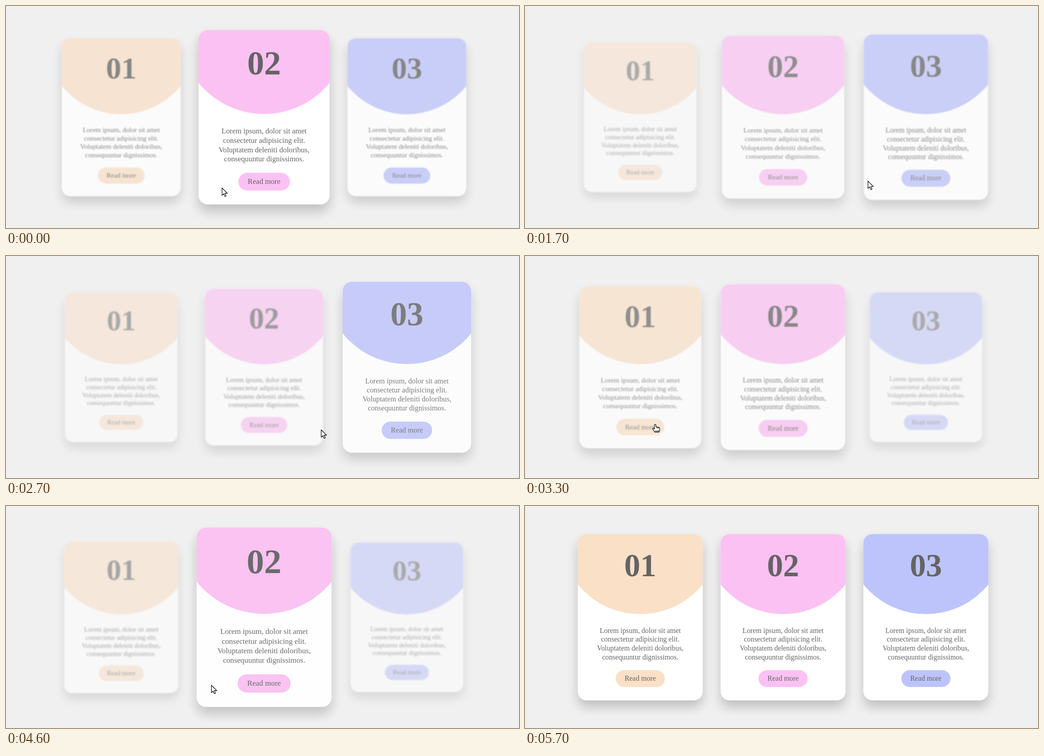
An HTML page that plays this animation: 1135 px wide and 493 px high, repeating every 5800 ms.

```html
<!DOCTYPE html>
<html lang="en">
<head>
<meta charset="utf-8">
<title>Hover cards</title>
<style>
  html, body { margin: 0; width: 100%; height: 100%; overflow: hidden; background: #f0f0f0; }
  #stage { position: relative; width: 1135px; height: 493px; overflow: hidden; }
  .card {
    position: absolute; width: 280px; height: 374px; top: 60px; overflow: hidden;
    border-radius: 20px; background: #fff; box-shadow: 0 15px 25px rgba(0, 0, 0, .2);
    font: 16px/20px "Liberation Serif", "Times New Roman", serif;
    color: #646464; text-align: center;
  }
  .card > * { position: absolute; margin: 0; }
  .disc { width: 360px; height: 360px; left: -40px; top: -180.5px; border-radius: 50%; background: var(--tint); }
  .number { width: 100%; top: 35.3px; font-size: 72px; line-height: 72px; font-weight: bold; }
  .copy { width: 100%; top: 206.5px; white-space: nowrap; }
  .button {
    left: 85px; top: 306px; width: 110px; height: 38px; line-height: 38px;
    border-radius: 19px; background: var(--tint); white-space: nowrap;
  }
  #cursor { position: absolute; left: 0; top: 0; width: 40px; height: 40px; overflow: visible; }
  #cursor path { fill: #fff; stroke: #111; stroke-width: 1.3; stroke-linejoin: round; }
</style>
</head>
<body>
<div id="stage"></div>
<script>
const LOOP = 5800, STEP = 100, DURATION = 500;
const UNIT = 0.9875, FIRST_X = 255.3, PITCH = 316, CENTER_Y = 247;
const HOVER = 1.1, DIM = 0.9, REST = 1;

// The pointer leaves a card GAP ms before it enters the next, and leaves them all at EXIT.
const GAP = 35, EXIT = 5150;
const visits = [
  { card: 1, enter: -145 }, { card: 2, enter: 1560 }, { card: 1, enter: 2620 },
  { card: 0, enter: 3183 }, { card: 1, enter: 4290 }
];

const stops = [
  { t: 0, x: 478, y: 404 }, { t: 1100, x: 583, y: 396 }, { t: 2100, x: 876, y: 384 },
  { t: 2200, x: 876, y: 384 }, { t: 2450, x: 868, y: 391 }, { t: 3300, x: 288, y: 374 },
  { t: 3800, x: 262, y: 383 }, { t: 4200, x: 347, y: 368 }, { t: 5000, x: 562, y: 428 },
  { t: 5100, x: 562, y: 428 }, { t: 5200, x: 562, y: 520 }
];

const stage = document.getElementById('stage');
const copy = ['Lorem ipsum, dolor sit amet', 'consectetur adipisicing elit.',
  'Voluptatem deleniti doloribus,', 'consequuntur dignissimos.'].join('<br>');

// A card dims when any card is first entered, grows while visited, and rests after the exit.
function movesFor(card) {
  const moves = [{ t: visits[0].enter, scale: DIM }];
  visits.forEach((visit, i) => {
    if (visit.card !== card) return;
    const next = visits[i + 1];
    moves.push({ t: visit.enter, scale: HOVER });
    moves.push(next ? { t: next.enter - GAP, scale: DIM } : { t: EXIT - GAP, scale: REST });
  });
  if (moves[moves.length - 1].scale !== REST) moves.push({ t: EXIT, scale: REST });
  return moves;
}

const cards = ['#fae0c7', '#fbc1f3', '#bdc4fb'].map((tint, i) => {
  const x = FIRST_X + i * PITCH;
  const el = document.createElement('div');
  el.className = 'card';
  el.style.left = x - 140 + 'px';
  el.style.setProperty('--tint', tint);
  el.innerHTML = `<div class="disc"></div><div class="number">0${i + 1}</div>
    <p class="copy">${copy}</p><div class="button">Read more</div>`;
  stage.append(el);
  return { el, x, moves: movesFor(i) };
});

stage.insertAdjacentHTML('beforeend', `<svg id="cursor">
  <path id="arrow" d="M0 0V16.5L3.8 13L6.4 19L9 17.9L6.5 12H11.8Z"/>
  <g id="hand">
    <path d="M-1.7 9V1.7a1.7 1.7 0 0 1 3.4 0V5.5L8 6.4q2 .5 2 2.5v4L8.5 17H-1L-5.3 10.6q-1-2 .8-2.3q1.2 0 2.8 2z"/>
    <path d="M4.3 6.3v2.5M7 6.7v2.4M-.6 14.7H8.6"/>
  </g></svg>`);
const cursor = document.getElementById('cursor');
const arrow = document.getElementById('arrow');
const hand = document.getElementById('hand');

const mix = (a, b, k) => a + (b - a) * k;

// CSS "ease", cubic-bezier(.25, .1, .25, 1), solved by bisection
function ease(t) {
  if (t <= 0) return 0;
  if (t >= 1) return 1;
  const curve = (a, b, u) => 3 * a * u * (1 - u) ** 2 + 3 * b * u * u * (1 - u) + u ** 3;
  let lo = 0, hi = 1;
  for (let i = 0; i < 24; i++) {
    const u = (lo + hi) / 2;
    if (curve(0.25, 0.25, u) < t) lo = u; else hi = u;
  }
  return curve(0.1, 1, lo);
}

function poseAt(moves, t) {
  let from = REST, to = REST, start = -DURATION;
  for (const move of moves) {
    // A move replaced at the same instant never becomes a starting pose.
    if (move.t <= t) {
      if (move.t > start) from = to;
      to = move.scale;
      start = move.t;
    }
  }
  const k = ease((t - start) / DURATION);
  const dim = mix(from === DIM ? 1 : 0, to === DIM ? 1 : 0, k);
  return { scale: mix(from, to, k), dim };
}

function pointerAt(t) {
  const i = stops.findIndex(stop => stop.t > t);
  if (i < 0) return stops[stops.length - 1];
  const a = stops[i - 1], b = stops[i];
  const k = (t - a.t) / (b.t - a.t);
  return { x: mix(a.x, b.x, k), y: mix(a.y, b.y, k) };
}

function draw(t) {
  const pointer = pointerAt(t);
  let onButton = false;
  for (const { el, x, moves } of cards) {
    const { scale, dim } = poseAt(moves, t);
    el.style.transform = `scale(${scale * UNIT})`;
    el.style.opacity = 1 - dim / 2;
    el.style.filter = dim > 0 ? `blur(${dim * 2}px)` : 'none';
    const dx = Math.abs(pointer.x - x) / scale, dy = (pointer.y - CENTER_Y) / scale;
    if (dx < 54.3 && dy > 117.5 && dy < 155) onButton = true;
  }
  cursor.style.transform = `translate(${pointer.x}px, ${pointer.y}px)`;
  arrow.style.display = onButton ? 'none' : '';
  hand.style.display = onButton ? '' : 'none';
}

function tick() {
  const t = performance.now() % LOOP;
  draw(Math.floor(t / STEP) * STEP);
  requestAnimationFrame(tick);
}
tick();
</script>
</body>
</html>
```
